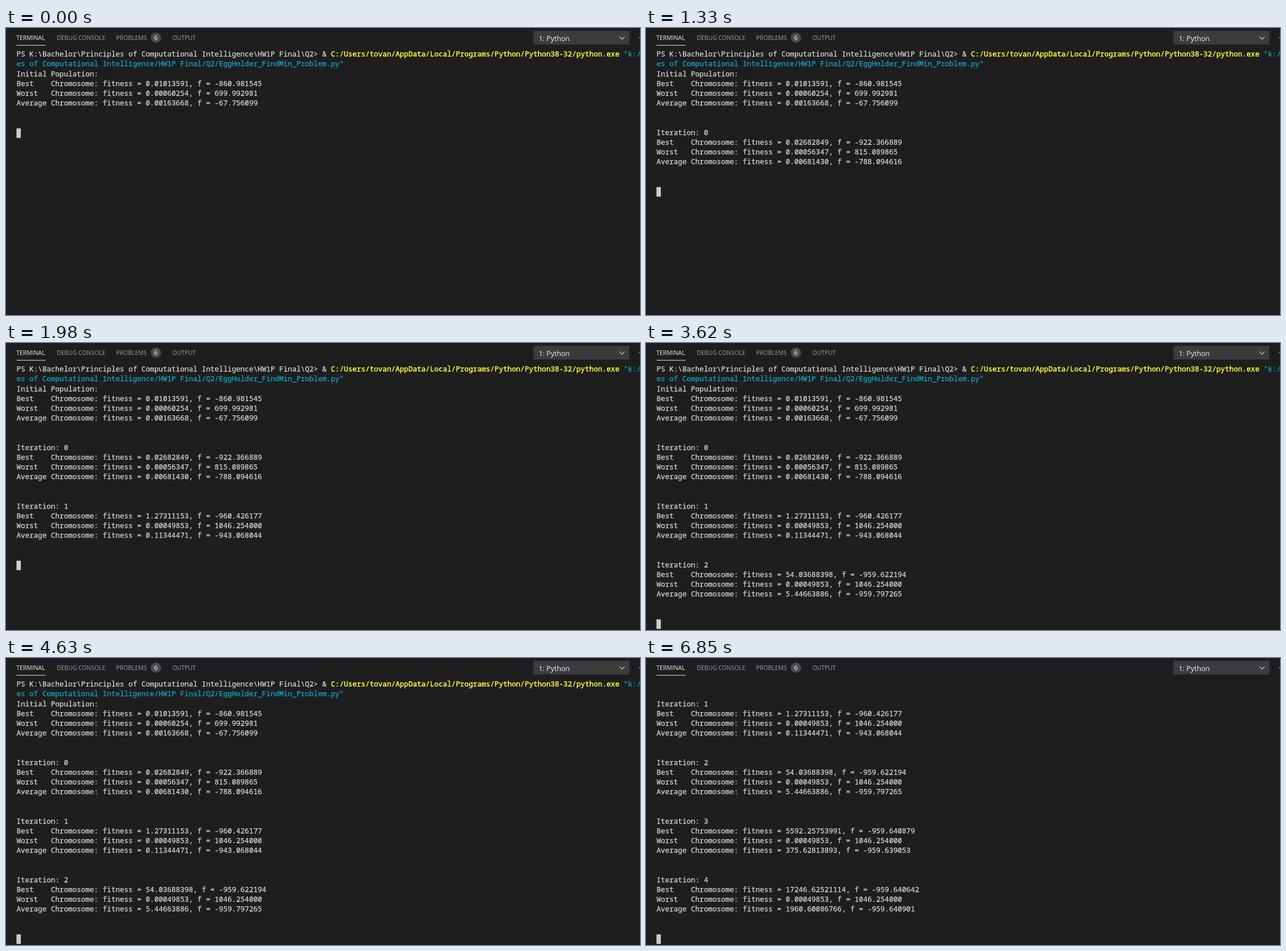
These frames come from a looping animation (1111 by 504 pixels, 8 s). An HTML page:

```html
<!DOCTYPE html>
<html lang="en">
<head>
<meta charset="utf-8">
<title>Terminal</title>
<style>
  :root { --row: 17.1667px; }
  html, body { margin: 0; width: 100%; height: 100%; overflow: hidden; background: #1e1e1e; }
  .bar { position: absolute; left: 0; top: 0; font: 10.4px "Open Sans", sans-serif; fill: #a0a0a0; }
  .bar .on { fill: #f0f0f0; }
  .term {
    position: absolute; left: 18.4px; top: 37.25px; right: 0; bottom: 0; overflow: hidden;
    color: #d8d8d8; font: 12.58px/var(--row) "Noto Sans Mono", monospace;
    -webkit-text-stroke: .25px;
  }
  .feed { animation: scroll 8s step-end infinite; }
  .log { margin: 0; font: inherit; overflow: hidden; animation: print 8s step-end infinite; }
  .cursor {
    box-sizing: border-box; width: 8px; height: 17px; margin-top: 1.5px;
    background: #ccc; border: solid #8c8c8c; border-width: 1px 0 0 1px;
  }
  .cmd { color: #f8f840; -webkit-text-stroke-width: .45px; }
  .arg { color: #11a8cd; }
  @keyframes print {
    0%      { height: calc(8 * var(--row)); }
    4.5%    { height: calc(14 * var(--row)); }
    24.75%  { height: calc(20 * var(--row)); }
    45.25%  { height: calc(26 * var(--row)); }
    66.25%  { height: calc(32 * var(--row)); }
    85.625%, 100% { height: calc(38 * var(--row)); }
  }
  @keyframes scroll {
    0%      { margin-top: 0; }
    66.25%  { margin-top: calc(-6 * var(--row)); }
    85.625%, 100% { margin-top: calc(-12 * var(--row)); }
  }
</style>
</head>
<body>
<svg class="bar" width="1111" height="37">
  <text class="on" x="18.3" y="20.5">TERMINAL</text>
  <path d="M18.4 30.3h51" stroke="#e7e7e7"/>
  <text x="89" y="20.5">DEBUG CONSOLE</text>
  <text x="193" y="20.5">PROBLEMS</text>
  <circle cx="262.7" cy="17" r="9" fill="#4d4d4d"/>
  <text x="262.7" y="21" text-anchor="middle" font-size="11" style="fill:#fff">6</text>
  <text x="291.5" y="20.5">OUTPUT</text>
  <rect x="924.5" y="5" width="168" height="24" fill="#3c3c3c"/>
  <text x="933.5" y="22.5" font-size="12.4" style="fill:#f0f0f0">1: Python</text>
  <path d="M1075 15.2l4.6 4.6 4.6-4.6" fill="none" stroke="#e0e0e0" stroke-width="1.1"/>
  <path d="M1109 16.8h2" stroke="#c5c5c5"/>
</svg>
<div class="term">
<div class="feed">
<pre class="log">PS K:\Bachelor\Principles of Computational Intelligence\HW1P Final\Q2&gt; &amp; <span class="cmd">C:/Users/tovan/AppData/Local/Programs/Python/Python38-32/python.exe</span> <span class="arg">"k:/
es of Computational Intelligence/HW1P Final/Q2/EggHolder_FindMin_Problem.py"</span>
Initial Population:
Best    Chromosome: fitness = 0.01013591, f = -860.981545
Worst   Chromosome: fitness = 0.00060254, f = 699.992981
Average Chromosome: fitness = 0.00163668, f = -67.756099


Iteration: 0
Best    Chromosome: fitness = 0.02682849, f = -922.366889
Worst   Chromosome: fitness = 0.00056347, f = 815.089865
Average Chromosome: fitness = 0.00681430, f = -788.094616


Iteration: 1
Best    Chromosome: fitness = 1.27311153, f = -960.426177
Worst   Chromosome: fitness = 0.00049853, f = 1046.254000
Average Chromosome: fitness = 0.11344471, f = -943.068044


Iteration: 2
Best    Chromosome: fitness = 54.03688398, f = -959.622194
Worst   Chromosome: fitness = 0.00049853, f = 1046.254000
Average Chromosome: fitness = 5.44663886, f = -959.797265


Iteration: 3
Best    Chromosome: fitness = 5592.25753991, f = -959.640879
Worst   Chromosome: fitness = 0.00049853, f = 1046.254000
Average Chromosome: fitness = 375.62813893, f = -959.639053


Iteration: 4
Best    Chromosome: fitness = 17246.62521114, f = -959.640642
Worst   Chromosome: fitness = 0.00049853, f = 1046.254000
Average Chromosome: fitness = 1960.60086766, f = -959.640901


</pre>
<div class="cursor"></div>
</div>
</div>
</body>
</html>
```
